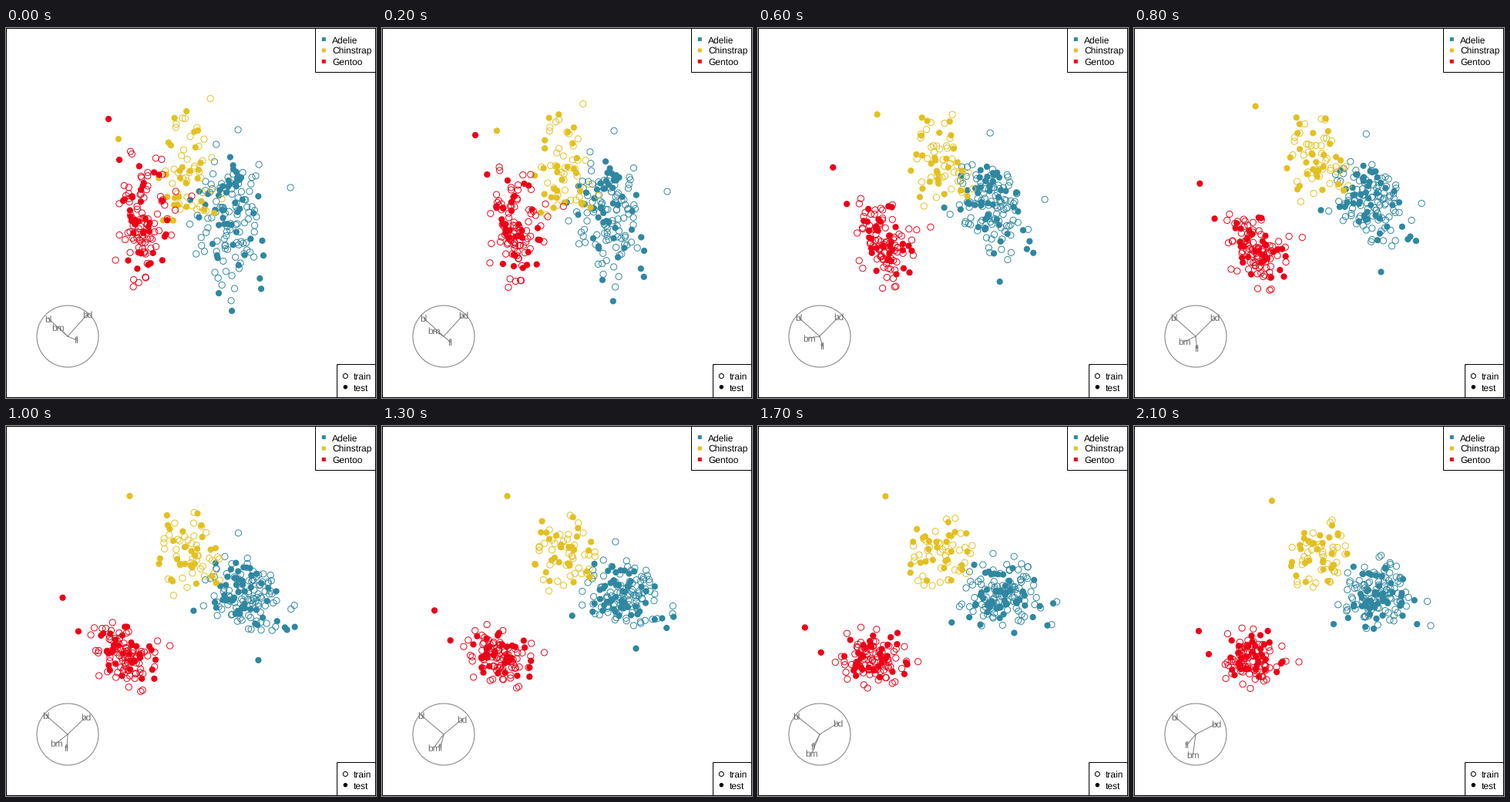
Write a matplotlib script that moves like this. It is 480 px wide and 480 px high and loops after 2200 ms.

```python
import numpy as np
import matplotlib.pyplot as plt
from matplotlib.animation import FuncAnimation
from matplotlib.patches import Circle, Rectangle

SIZE, DPI = 480, 100
PX = 72 / DPI          # one pixel in points
FRAMES, STEP_MS = 22, 100
GREY = "#7f7f7f"
plt.rcParams["font.family"] = "Liberation Sans"
plt.rcParams["text.hinting"] = "none"

# Tour: tips of the variable axes (pixels, y up) where the path turns
VARS = ["bl", "bd", "bm", "fl"]
TURNS = [0, 10, 17, 21]
TIPS = np.array([
    [(-25, 23), (26, 29), (-12, 12), (11.5, -5)],
    [(-28.5, 25), (24, 23), (-14.5, -11.5), (-1, -18)],
    [(-30, 24), (24, 15), (-10, -24.5), (-8, -15.5)],
    [(-27, 23), (27, 14), (-3.5, -26), (-11.5, -14)],
])
HUB, RADIUS = np.array([80, 400]), 40
MID = np.array([240, 240])
FLIP = np.array([1, -1])

# name, colour, count, spread, correlation,
# centre and outliers as places (x, y at the start, x, y at the end)
SPECIES = [
    ("Adelie", "#2f87a1", 146, 31, 0.54, (291, 246, 316, 219),
     [(293, 367, 311, 263), (239, 223, 259, 257)],
     [(369, 207, 385, 259), (301, 132, 318, 170)]),
    ("Chinstrap", "#e3c021", 68, 29, 0.62, (236, 188, 241, 168),
     [(146, 144, 179, 97), (249, 133, 257, 129)],
     [(212, 248, 212, 206)]),
    ("Gentoo", "#ec0016", 119, 28, 0.68, (178, 250, 152, 302),
     [(133, 118, 84, 266), (147, 171, 97, 296)],
     [(241, 218, 214, 306)]),
]


def tips_at(step):
    """Axis tips (4 x 2), moving straight from turn to turn."""
    i = min(np.searchsorted(TURNS, step, side="right") - 1, len(TURNS) - 2)
    u = (step - TURNS[i]) / (TURNS[i + 1] - TURNS[i])
    return (1 - u) * TIPS[i] + u * TIPS[i + 1]


def project(data, step):
    return MID + data @ (tips_at(step) / RADIUS) * FLIP


def lift(places):
    """4-D data from screen places at the start and the end."""
    p = np.atleast_2d(places).astype(float)
    rel = np.hstack([(p[:, :2] - MID) * FLIP, (p[:, 2:] - MID) * FLIP])
    basis = np.hstack([tips_at(0), tips_at(FRAMES - 1)]) / RADIUS
    return np.linalg.solve(basis.T, rel.T).T


def cloud(rng, n, centre, spread, rho):
    """Correlated normal cloud without far tails."""
    z = rng.standard_normal((n, 4))
    z *= np.minimum(1, 2.7 / np.linalg.norm(z, axis=1, keepdims=True))
    z = (z - z.mean(axis=0)) / z.std(axis=0)
    cov = spread ** 2 * ((1 - rho) * np.eye(4) + rho)
    return lift(centre) + z @ np.linalg.cholesky(cov).T


def make_data(rng):
    data, edges, test_flags = [], [], []
    for _, colour, count, spread, rho, centre, test, train in SPECIES:
        n = count - len(test) - len(train)
        data += [cloud(rng, n, centre, spread, rho), lift(test + train)]
        edges += [colour] * count
        test_flags += [*(rng.random(n) < 0.36),
                       *[True] * len(test), *[False] * len(train)]
    return np.vstack(data), edges, test_flags


def marker_area(radius):
    return (2 * radius * PX) ** 2


def label(x, y, text, **kw):
    return ax.text(x, y + 4.4, text, fontsize=12 * PX, va="baseline", **kw)


def box(x, y, w, h, **kw):
    ax.add_patch(Rectangle((x, y), w, h, lw=PX, snap=False, **kw))


fig = plt.figure(figsize=(SIZE / DPI, SIZE / DPI), dpi=DPI, facecolor="white")
ax = fig.add_axes([0, 0, 1, 1])
ax.set_xlim(0, SIZE)
ax.set_ylim(SIZE, 0)
ax.axis("off")

# Plot border and legends
box(0.5, 0.5, 479, 479, fill=False, ec="black", zorder=6)
box(401.5, 0.5, 78, 57, fc="white", ec="black", zorder=4)
box(429.5, 436.5, 50, 43, fc="white", ec="black", zorder=4)
for i, (name, colour, *_) in enumerate(SPECIES):
    y = 14.6 + 14.4 * i
    box(409.8, y - 2.5, 5, 5, fc=colour, ec="none", zorder=5)
    label(423, y + 0.4, name, color="black", zorder=5)
for y, name, radius, fill in [(451.5, "train", 3, "none"),
                              (465.8, "test", 2.2, "black")]:
    ax.add_patch(Circle((440.3, y), radius, fc=fill, ec="black", lw=PX,
                        zorder=5))
    label(451, y + 0.4, name, color="black", zorder=5)

# Axis dial
ax.add_patch(Circle(HUB, RADIUS, fill=False, ec=GREY, lw=PX))
spokes = [ax.plot([], [], color=GREY, lw=PX)[0] for _ in VARS]
names = [label(0, 0, v, color="#6f6f6f", ha="center") for v in VARS]

points, edges, is_test = make_data(np.random.default_rng(12))
faces = [c if t else (0, 0, 0, 0) for c, t in zip(edges, is_test)]
widths = [0 if t else 0.95 * PX for t in is_test]
dots = ax.scatter(*project(points, 0).T, s=marker_area(4.1), facecolors=faces,
                  edgecolors=edges, linewidths=widths, zorder=3)
dots.set_snap(False)


def draw(step):
    dots.set_offsets(project(points, step))
    for tip, spoke, name in zip(HUB + tips_at(step) * FLIP, spokes, names):
        spoke.set_data([HUB[0], tip[0]], [HUB[1], tip[1]])
        name.set_position((tip[0], tip[1] + 4.4))
    return [dots, *spokes, *names]


anim = FuncAnimation(fig, draw, frames=FRAMES, interval=STEP_MS,
                     repeat=True, repeat_delay=0, blit=False)
plt.show()
```
